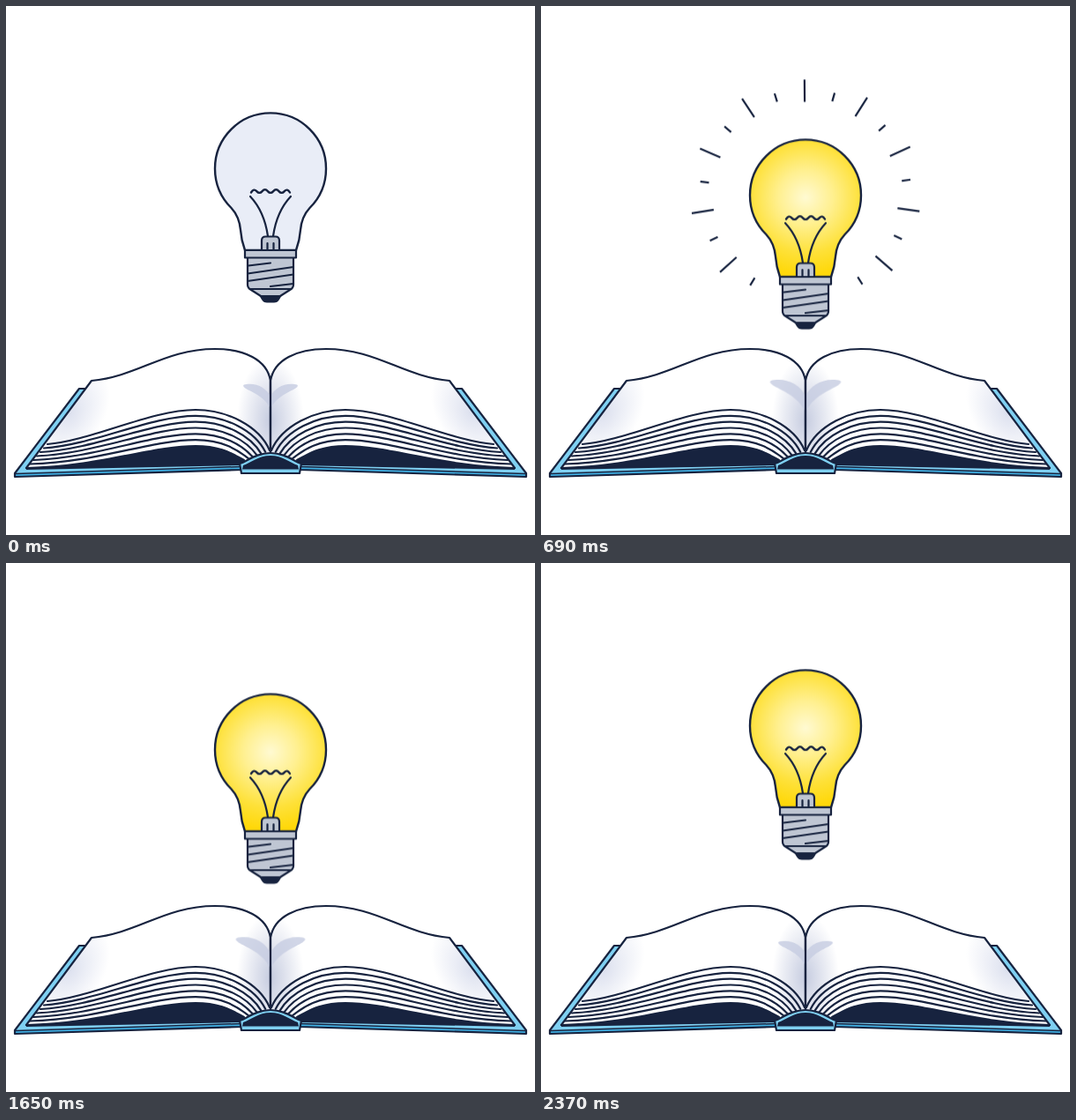
Animation, 600 px wide and 600 px high, one loop 2400 ms. Source, as an HTML page:

```html
<!DOCTYPE html>
<html lang="en">
<head>
<meta charset="utf-8">
<title>Idea from a book</title>
<style>
  @property --tail { syntax: "<length>"; inherits: true; initial-value: 0px; }
  @property --head { syntax: "<length>"; inherits: true; initial-value: 0px; }

  html, body { margin: 0; width: 100%; height: 100%; overflow: hidden; background: #fff; }
  svg { display: block; width: 100%; height: 100%; }

  .ink { fill: none; stroke: #17233f; stroke-width: 2.2; stroke-linejoin: round; stroke-linecap: round; }
  .bold { stroke-width: 2.4; }
  .dark { fill: #17233f; }
  .metal { fill: #bfc6d3; }
  .sky { fill: #7fd0f2; }
  .sea { fill: #3fb0e4; }

  .bulb { animation: bob .6s cubic-bezier(.3642, 0, .6358, 1) infinite alternate; }
  .shadow {
    fill: #c6cce1; fill-opacity: .8;
    transform-origin: 300px 445px;
    animation: spread .6s cubic-bezier(.3642, 0, .6358, 1) infinite alternate;
  }
  .lit { animation: light 2.4s linear infinite; }
  .rays { animation: head 2.4s infinite, tail 2.4s infinite; }
  .rays path {
    stroke: #17233f; stroke-width: 2.2;
    stroke-dasharray: 0px, var(--tail), calc(var(--head) - var(--tail)), 300px;
  }

  @keyframes bob { to { transform: translateY(32px); } }
  @keyframes spread { to { transform: scale(1.32); } }
  @keyframes light { 0%, 12.5% { opacity: 0; } 17.5%, 100% { opacity: 1; } }
  @keyframes head {
    0% { --head: 0px; }
    12.5% { --head: 0px; animation-timing-function: cubic-bezier(.3333, .6667, .6667, 1); }
    32.5%, 100% { --head: 100px; }
  }
  @keyframes tail {
    0% { --tail: 0px; }
    20% { --tail: 0px; animation-timing-function: cubic-bezier(.3333, 0, .6667, .3333); }
    32.5%, 100% { --tail: 100px; }
  }
</style>
</head>
<body>
<svg viewBox="0 0 600 600">
  <defs>
    <radialGradient id="glow" gradientUnits="userSpaceOnUse" cx="300" cy="187" r="88">
      <stop offset="0" stop-color="#fffad2"/>
      <stop offset=".35" stop-color="#fff090"/>
      <stop offset=".72" stop-color="#fee139"/>
      <stop offset="1" stop-color="#ffd80a"/>
    </radialGradient>
    <radialGradient id="fold" gradientUnits="userSpaceOnUse" cx="0" cy="0" r="1"
      gradientTransform="translate(300 470) scale(38 72)">
      <stop offset="0" stop-color="#c6cce0"/>
      <stop offset="1" stop-color="#c6cce0" stop-opacity="0"/>
    </radialGradient>
    <radialGradient id="corner" gradientUnits="userSpaceOnUse" cx="0" cy="0" r="1"
      gradientTransform="translate(72 462) rotate(-54) scale(58 38)">
      <stop offset="0" stop-color="#dde1ef"/>
      <stop offset="1" stop-color="#dde1ef" stop-opacity="0"/>
    </radialGradient>
    <path id="page" d="M97 425C150 420 180 389 237 389C270 389 296 401 300 425V507L268 520L23 525Z"/>
    <path id="glass" d="M271 277C267 266 266.500 261 266 254C265 243 262 236 255.500 229A63 63 0 1 1 344.500 229C338 236 335 243 334 254C333.500 261 333 266 329 277Z"/>
  </defs>

  <g id="half">
    <path class="sky" d="M90 434H83L10 530V534L267 526V518L24 524L97 425Z"/>
    <path class="sea" d="M11 531L267 523V526L11 534Z"/>
    <path class="ink" d="M90 434H83L10 530V534L267 526V518L24 524"/>
    <path class="ink" style="stroke-width:1.500" d="M11 530.500L267 522.500"/>
    <use href="#page" fill="#fff"/>
    <use href="#page" fill="url(#corner)"/>
    <use href="#page" fill="url(#fold)"/>
    <g id="leaves"></g>
    <path class="ink" d="M23 524L97 425C150 420 180 389 237 389C270 389 296 401 300 425V505"/>
  </g>
  <use href="#half" transform="matrix(-1 0 0 1 600 0)"/>

  <g class="shadow">
    <path id="arm" d="M300 457C296 448 288 442 278 437C269 433 266 429.500 273 429C285 427.500 296 434 300 443Z"/>
    <use href="#arm" transform="matrix(-1 0 0 1 600 0)"/>
  </g>
  <path class="ink" d="M300 425V506"/>

  <path class="sky" d="M265 519C274 516 284 507 300 507S326 516 335 519L333 530H267Z"/>
  <path class="ink" d="M265 519C274 516 284 507 300 507S326 516 335 519L333 530H267Z"/>
  <path class="dark" d="M269 521C278 518 286 510 300 510S322 518 331 521L332 525.500H268Z"/>

  <g class="bulb">
    <g class="rays" id="rays"></g>
    <use href="#glass" fill="#e9edf7"/>
    <use href="#glass" class="lit" fill="url(#glow)"/>
    <use href="#glass" class="ink bold"/>
    <path class="ink bold" d="M278 211.500q3.150-5 6.300-1.400t6.300 0t6.300 0t6.300 0t6.300 0t6.300 0q3.150-3.600 6.200 1.400"/>
    <path class="ink" d="M277 216Q293 233 297 261M323 216Q307 233 303 261"/>
    <path class="metal" d="M290 277V266Q290 261.500 294.500 261.500H305.500Q310 261.500 310 266V277ZM274 286V316Q274 320 278 322L289 329H311L322 322Q326 320 326 316V286ZM271 277H329V285.500H271Z"/>
    <path class="ink" d="M290 277V266Q290 261.500 294.500 261.500H305.500Q310 261.500 310 266V277M296.500 269V276M303.500 269V276"/>
    <path class="ink" d="M274 286V316Q274 320 278 322L289 329H311L322 322Q326 320 326 316V286M271 277H329V285.500H271Z"/>
    <path class="ink" d="M275 294.500L300 291.500M274 303.500L326 296M274 312L326 304.500M300 318L326 315M277 321H323"/>
    <path class="dark" d="M287 328H313L310 333Q308 336.500 304 336.500H296Q292 336.500 290 333Z"/>
  </g>
</svg>
<script>
  const add = (id, d, attrs) => {
    const path = document.createElementNS("http://www.w3.org/2000/svg", "path");
    path.setAttribute("d", d);
    for (const key in attrs) path.setAttribute(key, attrs[key]);
    document.getElementById(id).append(path);
  };

  // Page edges fan out from the top leaf to the dark underside.
  const LEAVES = 6;
  for (let i = 0; i <= LEAVES; i++) {
    const k = i / LEAVES;
    const x = 47 - 24 * k, y = 497 + 27 * k, top = 458 + 41 * k;
    const endX = 299 - 29 * k, endY = 504 + 11 * k;
    const edge = `M${x} ${y}C${x + 50 + 35 * k} ${y - 4 + 2 * k} 165 ${top} 215 ${top}` +
      `C${250 - 5 * k} ${top} ${endX - 12} ${endY - 28 + 22 * k} ${endX} ${endY}`;
    if (i === LEAVES) add("leaves", edge + "L267 521L23 526Z", { class: "dark" });
    add("leaves", edge, { class: "ink" });
  }

  // Long and short rays alternate around the glass, turned by a hair.
  for (let i = -9; i <= 9; i++) {
    const [from, to] = i % 2 ? [100, 121] : [79, 132.5];
    const a = (i * 16.45 - .5) * Math.PI / 180;
    const at = r => `${300 + r * Math.sin(a)} ${184 - r * Math.cos(a)}`;
    add("rays", `M${at(from)}L${at(to)}`, { pathLength: 100 });
  }
</script>
</body>
</html>
```
